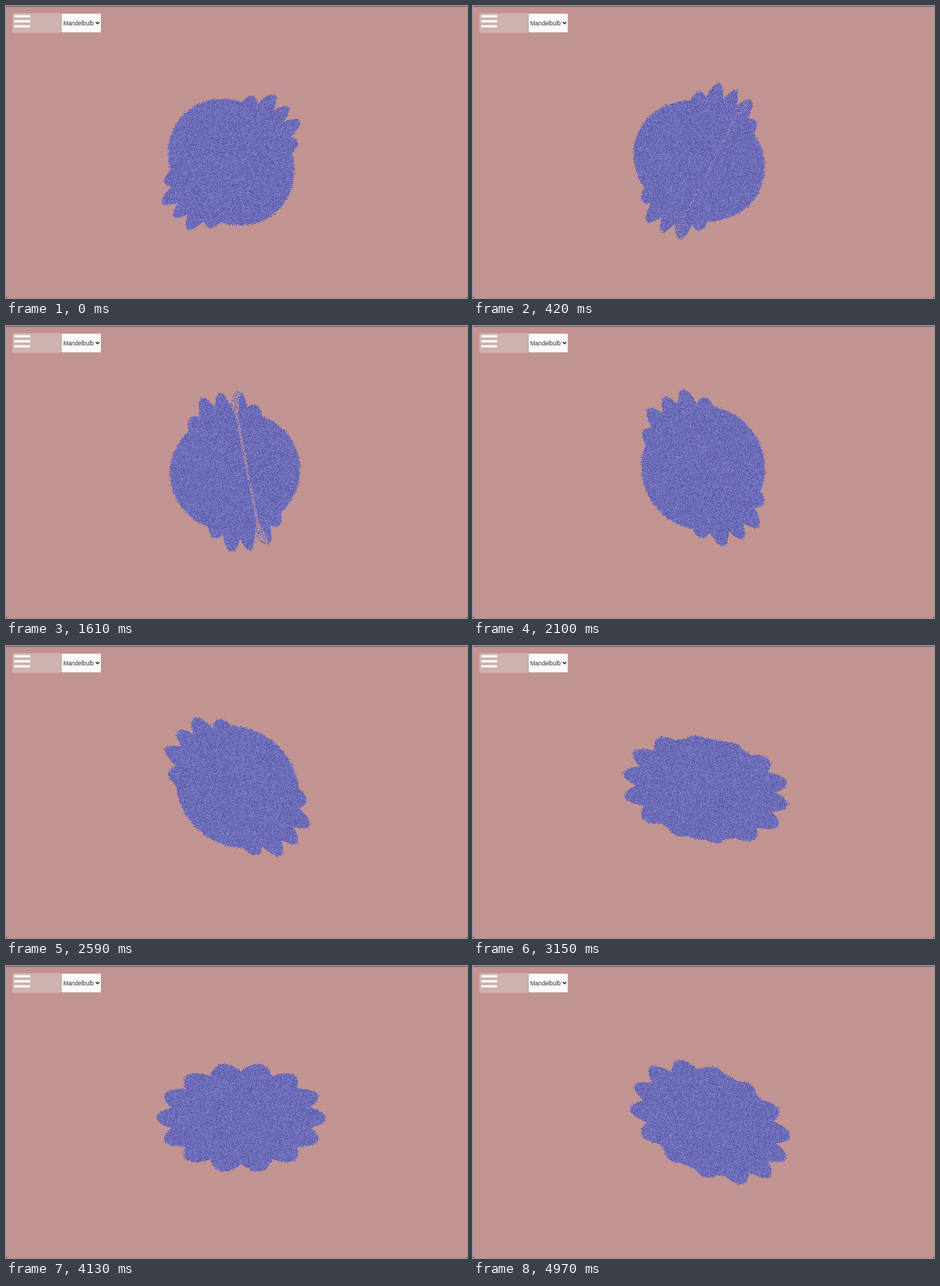
Recreate the animation shown at these times as an HTML page with a canvas. Size 640 by 406 pixels, loop 5040 ms.

```html
<!DOCTYPE html>
<html>
<head>
<meta charset="utf-8">
<title>Mandelbulb</title>
<style>
  html, body { margin: 0; width: 640px; height: 406px; overflow: hidden; background: #c29491; }
  canvas, svg { position: absolute; left: 0; top: 0; }
</style>
</head>
<body>
<canvas id="stage" width="640" height="406"></canvas>
<svg width="640" height="406">
  <path d="M0 .5H640" stroke="#704b4e"/>
  <path d="M0 404v2h2zM640 404v2h-2z" fill="#4a3437"/>
  <rect x="9" y="10" width="68" height="27.5" rx="2" fill="#cfb2b0"/>
  <path d="M11.5 14.2h22M11.5 21.2h22M11.5 28.2h22" stroke="#fff" stroke-width="3"/>
  <rect x="77" y="10.3" width="55" height="26.7" rx="1" fill="#fbf9fa" stroke="#a58a8a" stroke-width=".6"/>
  <text x="79.5" y="26.6" font-family="'Liberation Sans', Arial, sans-serif" font-size="8.2" fill="#363236">Mandelbulb</text>
  <path d="M124.6 22.2l2.5 2.5 2.5-2.5" fill="none" stroke="#252225" stroke-width="1.5"/>
</svg>
<script>
const LOOP = 5040, STEP = 70;
const ctx = document.getElementById('stage').getContext('2d');
const clamp = v => Math.max(0, Math.min(1, v));
const mix = (a, b, u) => a + (b - a) * u;

// Key poses of the tumbling bulb: axis tilt in degrees, how far the crowns open.
const poses = [
  { at: 0, tilt: -46, open: 0 },
  { at: 840, tilt: -9, open: 0 },
  { at: 1610, tilt: 11, open: 0.1 },
  { at: 2590, tilt: 47, open: 0.45 },
  { at: 3150, tilt: 79, open: 0.8 },
  { at: 4130, tilt: 90, open: 1 },
  { at: 4970, tilt: 64, open: 0.85 }
];

function poseAt(t) {
  const next = poses.find(p => p.at > t) || poses.at(-1);
  const prev = poses[poses.indexOf(next) - 1];
  const u = clamp((t - prev.at) / (next.at - prev.at));
  return { tilt: mix(prev.tilt, next.tilt, u), open: mix(prev.open, next.open, u) };
}

function seeded(seed) {
  return () => {
    seed = seed + 0x6D2B79F5 | 0;
    let h = Math.imul(seed ^ seed >>> 15, 1 | seed);
    h = h + Math.imul(h ^ h >>> 7, 61 | h) ^ h;
    return ((h ^ h >>> 14) >>> 0) / 4294967296;
  };
}

function draw(t) {
  const rand = seeded(t * 7919);
  const { tilt, open } = poseAt(t);
  const sin = Math.sin(tilt * Math.PI / 180), cos = Math.cos(tilt * Math.PI / 180);
  const cx = 312 + 17 * t / LOOP, cy = 206 + 10.5 * Math.cos(2 * Math.PI * t / LOOP);

  // A smooth body joined with a longer, lobed shape whose ends are the crowns.
  const bodyLength = mix(81, 99, open), bodyWidth = mix(93, 64, open);
  const crownLength = mix(110, 117, open), crownWidth = mix(54, 76, open);
  const power = mix(3.5, 2, open);
  const seam = clamp((30 - Math.abs(tilt)) / 12);

  function inside(u, v) {
    if (Math.hypot(u / bodyLength, v / bodyWidth) < 1) return true;
    const p = Math.abs(u) / crownLength, q = Math.abs(v) / crownWidth;
    const valley = 0.16 * (1 - Math.abs(Math.cos(7 * Math.atan2(q, p))));
    return (p ** power + q ** power) ** (1 / power) + valley < 1;
  }

  ctx.fillStyle = '#c29491';
  ctx.fillRect(0, 0, 640, 406);
  const left = 190, top = 75, w = 265, h = 260;
  const img = ctx.getImageData(left, top, w, h);
  for (let py = 0; py < h; py++) for (let px = 0; px < w; px++) {
    const x = px + left - cx, y = py + top - cy;
    const u = -x * sin - y * cos, v = x * cos - y * sin;
    const grain = rand(), hole = rand();
    const fray = 1.005 - 0.035 * rand() ** 2;
    if (!inside(u * fray, v * fray)) continue;

    // Thinly sampled seam along the axis, fanning out at both ends.
    const fan = Math.max(0, Math.abs(u) - 75) * 0.3;
    if (Math.abs(v - 17) < 1.8 + fan && hole < 0.5 * seam) continue;

    const n = (grain - 0.5) * 44, o = (py * w + px) * 4;
    img.data[o] = 109 + n;
    img.data[o + 1] = 108 + n;
    img.data[o + 2] = 185 + n;
  }
  ctx.putImageData(img, left, top);
}

let shown = -1;
function tick() {
  const t = Math.floor(performance.now() % LOOP / STEP) * STEP;
  if (t !== shown) draw(shown = t);
  requestAnimationFrame(tick);
}
tick();
</script>
</body>
</html>
```
